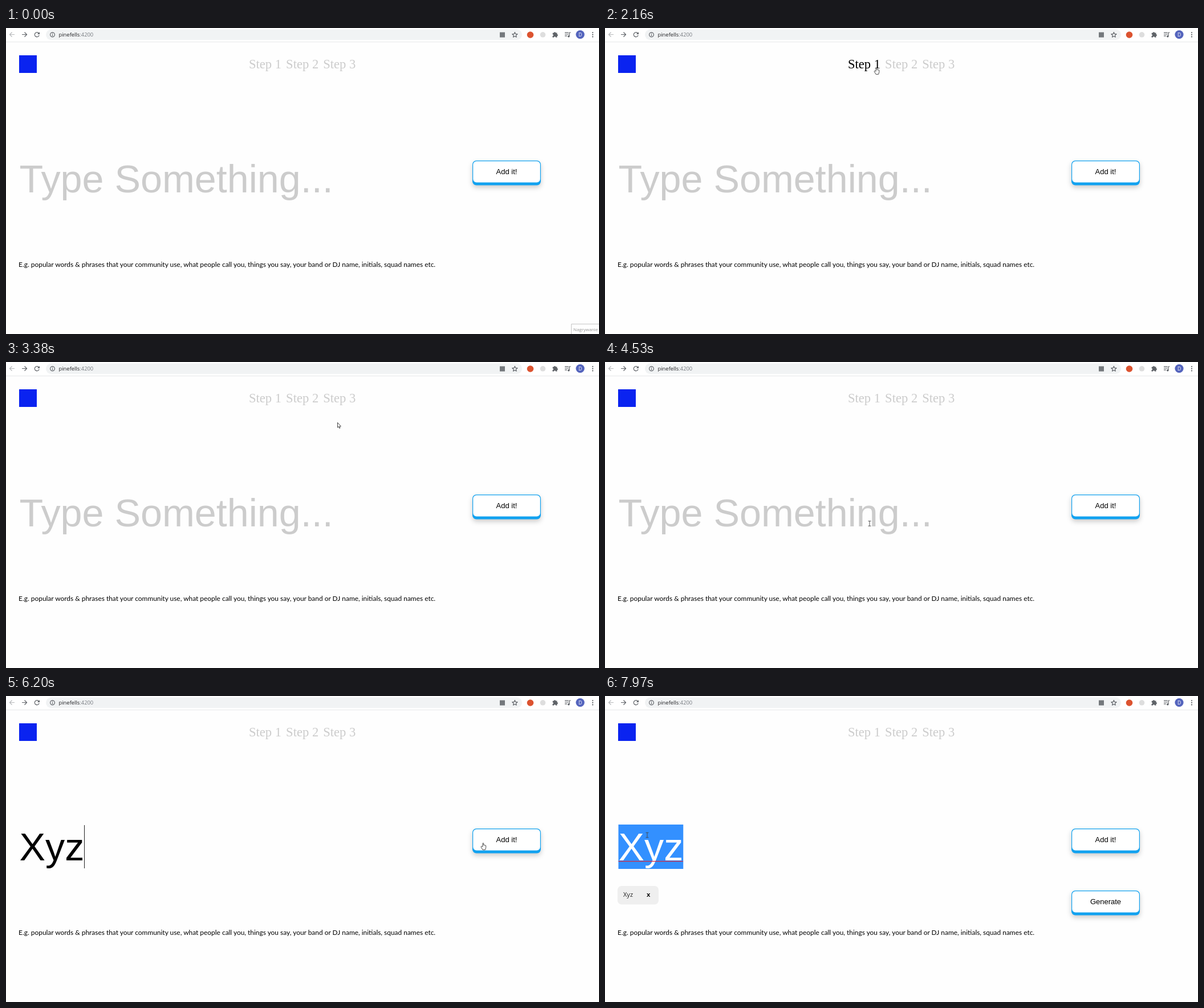
These frames come from a looping animation (1040x538 px, 8 s). An HTML page:

```html
<!DOCTYPE html>
<html lang="en">
<head>
<meta charset="utf-8">
<title>Word input</title>
<style>
  html, body { margin: 0; width: 100%; height: 100%; overflow: hidden; background: #fefefe; }
  svg { display: block; }
  .ui { font-family: "Open Sans", sans-serif; }
  .sans { font: 13px "Liberation Sans", Arial, sans-serif; }
  .steps { font: 22.6px "Liberation Serif", Times, serif; fill: #ccc; }
  .steps .over { fill: #000; }
  .hint { font: 11.93px Lato, sans-serif; }
  .big { font-size: 68.25px; }
  .mid { text-anchor: middle; }
  .line { fill: none; stroke: #5f6368; stroke-width: 1.2; }
  .button { filter: drop-shadow(0 4px 4px rgba(0, 0, 0, .2)); }
</style>
</head>
<body>
<svg width="1040" height="538">
  <defs>
    <g id="box">
      <rect class="button" x="818" y="233" width="120" height="43.5" rx="7" fill="#12a2f0"/>
      <rect x="819.2" y="234.2" width="117.6" height="37.3" rx="6" fill="#fff"/>
    </g>
  </defs>

  <!-- browser bar -->
  <rect width="1040" height="24" fill="#fff"/>
  <rect y="24" width="1040" height="1" fill="#e6e7e9"/>
  <rect x="70" y="2.5" width="835" height="18.5" rx="9.2" fill="#f1f3f4"/>
  <path class="line" stroke-opacity=".45" d="M15 11.5H6.5m4-4-4 4 4 4"/>
  <path class="line" d="M28 11.5h8.5m-4-4 4 4-4 4"/>
  <path class="line" d="M57.6 9.3a4 4 0 1 0 .6 3.4"/>
  <path fill="#5f6368" d="M59 7v4h-4z"/>
  <circle class="line" cx="81.5" cy="11.8" r="3.9"/>
  <path class="line" d="M81.5 11.2v2.8m0-4.8v1.1"/>
  <text class="ui" x="92.5" y="15.2" font-size="9.4" fill="#202124">pinefells<tspan fill="#777b80">:4200</tspan></text>
  <rect x="866" y="7.5" width="9" height="9" fill="#74787c"/>
  <path id="star" class="line" stroke-linejoin="round"/>
  <circle cx="919.5" cy="12" r="5.8" fill="#dc5330"/>
  <circle cx="941.5" cy="11.8" r="4.8" fill="#dedede"/>
  <path fill="#5f6368" d="M959 8.5h2a1.5 1.5 0 0 1 3 0h2.500v2.500a1.500 1.500 0 0 1 0 3v2.500h-2.500a1.500 1.500 0 0 0-3 0h-2.500v-2.500a1.500 1.500 0 0 0 0-3z"/>
  <path class="line" d="M980 8.2h6.500m-6.500 2.800h6.500m-6.500 2.800h4m4 1v-6.800h2.500"/>
  <circle cx="986.8" cy="14.8" r="1.7" fill="#5f6368"/>
  <circle cx="1007" cy="11.5" r="7.6" fill="#5464bd"/>
  <text class="ui mid" x="1007" y="14.6" font-size="8.5" fill="#fff">D</text>
  <path class="line" style="stroke-width:2.2" stroke-linecap="round" stroke-dasharray="0 3.7" d="M1029 8v7.5"/>

  <!-- page -->
  <rect x="23" y="48" width="31" height="31" fill="#0a23f0"/>
  <g id="steps" class="steps"></g>
  <text id="prompt" class="sans big" style="font-size:68.25px" x="23.5" y="288.6" fill="#ccc">Type Something...</text>
  <rect id="sel" y="226" height="78" fill="#3390ff"/>
  <text id="word" class="sans big" style="font-size:68.25px" x="23.5" y="288.6"><tspan>X</tspan><tspan>y</tspan><tspan>z</tspan></text>
  <rect id="spell" x="23.5" y="290" width="113.5" height="1.2" fill="#d8263c"/>
  <rect id="caret" y="227" width="1" height="76" fill="#222"/>
  <use href="#box"/>
  <text class="sans mid" x="878" y="257">Add it!</text>
  <g id="added">
    <use href="#box" y="109"/>
    <text class="sans mid" x="878" y="366">Generate</text>
    <rect x="22" y="334" width="72" height="32.5" rx="7" fill="#efefef"/>
    <text class="ui" x="32" y="353" font-size="11" fill="#222">Xyz</text>
    <text class="sans mid" x="76.3" y="353" font-weight="bold" style="font-size:11.5px;font-weight:bold">x</text>
  </g>
  <text class="hint" x="22" y="420">E.g. popular words &amp; phrases that your community use, what people call you, things you say, your band or DJ name, initials, squad names etc.</text>
  <g id="badge">
    <path d="M991.5 538V520.5H1040" fill="#fff" stroke="#c4c4c4"/>
    <text class="ui" x="995" y="533" font-size="7.8" fill="#949494">Nagrywanie</text>
  </g>

  <!-- pointers, each with its hot spot at 0,0 -->
  <g stroke="#333" stroke-width=".9" fill="#fff" stroke-linejoin="round">
    <path id="arrow" d="M.5.5v8.700l1.900-1.700 1.300 3 1.300-.5-1.200-2.900h2.600z"/>
    <path id="hand" d="M-.9 7.200v-6q.9-1.500 1.800 0v3.100q1.200-1 1.500.2 1-.8 1.200.4 1.200-.7 1.200.8v2.900l-1.200 3.800h-4.500l-2.900-5q.2-1.600 1.500-1z"/>
    <path id="beam" fill="none" stroke="#444" d="M-2.500-4.300h5m-2.500 0v8.600m-2.500 0h5"/>
  </g>
</svg>
<script>
const LOOP = 8000, TICK = 70;
const STEP_X = 426, STEP_GAP = 65.1, STEP_W = 57;
const LEFT = 23.5, SIZE = 68.25;
const ADD_AT = 6410, DRAG_AT = 6960, DRAG_END = 7440;
const el = id => document.getElementById(id);
const show = (id, on) => el(id).style.display = on ? "" : "none";
const between = (v, a, b) => v >= a && v < b;

// Left side of each letter, from the widths of X, y and z
const edges = [0, 2 / 3, 7 / 6, 5 / 3].map(w => LEFT + w * SIZE);
const letters = [...el("word").children];

const steps = [0, 1, 2].map(i => {
  const step = el("word").cloneNode(false);
  for (const name of ["id", "class", "style"]) step.removeAttribute(name);
  step.setAttribute("x", STEP_X + i * STEP_GAP);
  step.setAttribute("y", 71);
  step.textContent = "Step " + (i + 1);
  return el("steps").appendChild(step);
});

const corners = Array.from({ length: 10 }, (_, i) => {
  const r = i % 2 ? 2.2 : 4.8, a = i * Math.PI / 5;
  return [892.4 + r * Math.sin(a), 12.2 - r * Math.cos(a)];
});
el("star").setAttribute("d", "M" + corners.join("L") + "Z");

// The pointer slides from stop to stop and slows down before each one
const stops = [];
const glide = (start, end, x, y) => stops.push({ start, end, x, y });
glide(390, 390, 919, 450);
glide(390, 600, 703, 264);
glide(720, 1070, 421, 103.5);
glide(1070, 1540, 403, 71);
glide(1540, 1890, 476, 69);
glide(2110, 2390, 527, 69);
glide(2450, 3050, 591, 69);
glide(3240, 3380, 581, 106);
glide(3380, 4010, 464, 284);
glide(5850, 6270, 850, 257);
glide(ADD_AT, 6680, 477, 250);
glide(6680, DRAG_AT, 166, 230);
glide(DRAG_AT, DRAG_END, 1, 249);
glide(7500, 7970, 74, 244.5);

function pointerAt(t) {
  const i = stops.findLastIndex(s => s.start <= t);
  if (i < 0) return null;
  const to = stops[i], from = stops[i - 1] || to;
  const passed = Math.floor((t - to.start) / TICK) * TICK;
  const u = t >= to.end ? 1 : passed / (to.end - to.start);
  const k = Math.sin(u * Math.PI / 2);
  return { x: from.x + (to.x - from.x) * k, y: from.y + (to.y - from.y) * k };
}

function draw(t) {
  const pos = pointerAt(t), { x, y } = pos || { x: -99, y: -99 };
  const dragging = between(t, DRAG_AT, DRAG_END);
  const inInput = between(x, 22, 800) && between(y, 225, 304);
  let onLink = between(x, 818, 938) && between(y, 233, 276);

  steps.forEach((step, i) => {
    const over = between(x - STEP_X - i * STEP_GAP, 0, STEP_W) && between(y, 55, 81);
    step.classList.toggle("over", over);
    onLink = onLink || over;
  });

  const kind = !pos ? "" : onLink ? "hand" : inInput || dragging ? "beam" : "arrow";
  for (const id of ["arrow", "hand", "beam"]) {
    show(id, id === kind);
    el(id).setAttribute("transform", `translate(${x} ${y})`);
  }

  // One letter every 330 ms
  const typed = Math.max(0, Math.min(3, Math.floor((t - 5060) / 330) + 1));

  // A letter is selected once the drag has passed its middle
  const dragX = t < DRAG_AT ? Infinity : dragging ? x : 0;
  const picked = letters.map((_, i) => dragX < (edges[i] + edges[i + 1]) / 2);
  const from = picked.indexOf(true);
  letters.forEach((letter, i) => {
    letter.style.display = i < typed ? "" : "none";
    letter.style.fill = picked[i] ? "#fff" : "#000";
  });
  show("sel", from >= 0);
  if (from >= 0) {
    el("sel").setAttribute("x", edges[from]);
    el("sel").setAttribute("width", edges[3] - edges[from]);
  }

  show("spell", t >= DRAG_AT + TICK);
  show("prompt", !typed);
  show("caret", between(t, 4010, 4530) || between(t, 5060, 6250));
  el("caret").setAttribute("x", Math.floor(edges[typed]));
  show("added", t >= ADD_AT);
  show("badge", t < TICK);
}

const begin = performance.now();
function frame() {
  draw((performance.now() - begin) % LOOP);
  requestAnimationFrame(frame);
}
frame();
</script>
</body>
</html>
```
